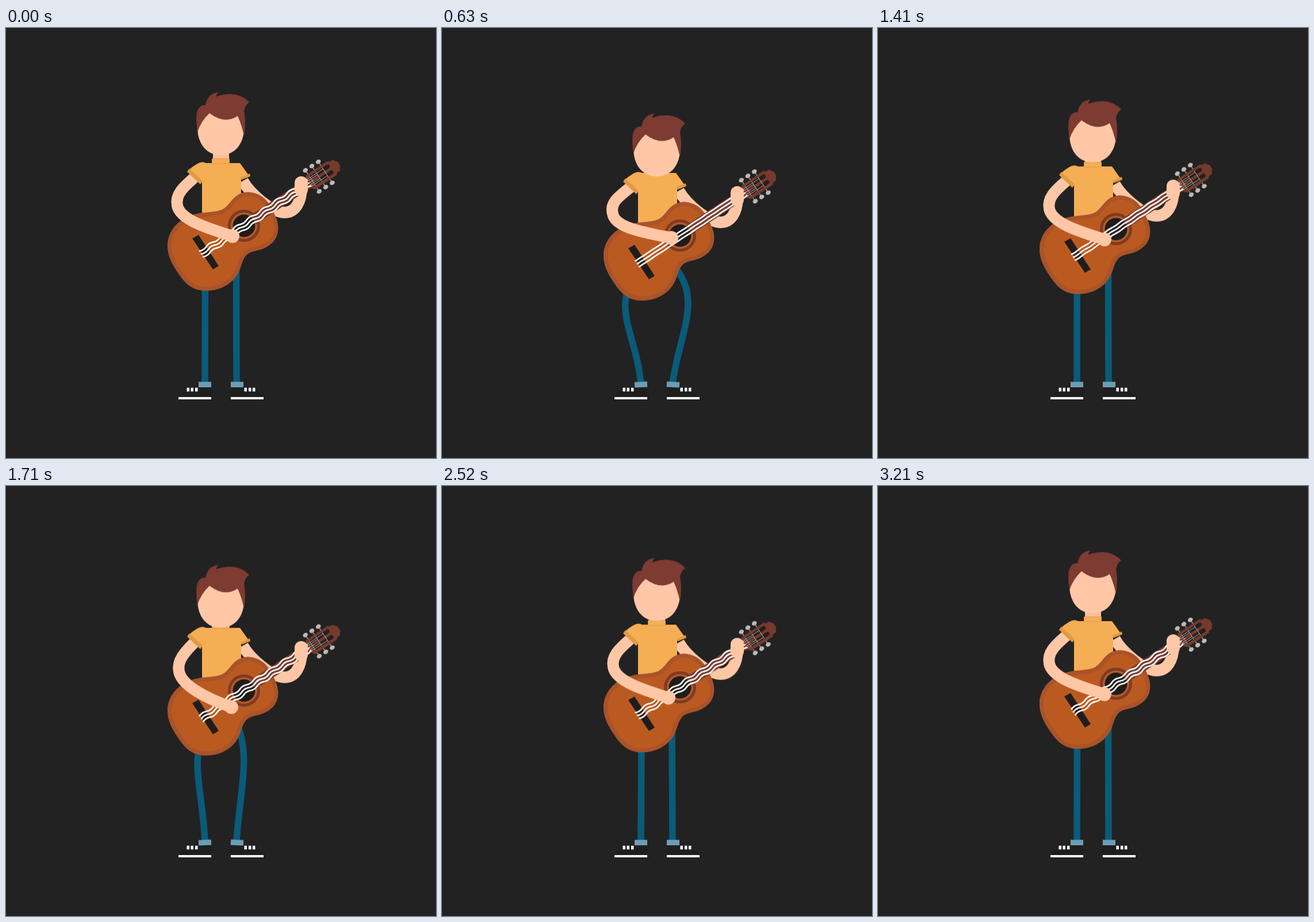
Write an HTML page without scripts that moves like this. It is 748 by 748 pixels and loops after 3240 ms.

```html
<!DOCTYPE html>
<html lang="en">
<head>
<meta charset="utf-8">
<title>Guitar player</title>
<style>
html, body { margin: 0; height: 100%; overflow: hidden; background: #222; }
svg { display: block; width: 100vw; height: 100vh; }

/* strength of the beat, swelling over three beats */
@property --depth { syntax: "<number>"; inherits: true; initial-value: 1; }
:root { --beat: 540ms; --sine: cubic-bezier(.37, 0, .63, 1); }
.man { animation: swell calc(3 * var(--beat)) var(--sine) infinite; }
@keyframes swell {
  0%, 100% { --depth: .65; }
  50% { --depth: 1; }
}

/* quick drop, slower rise; the legs straighten first */
.body, .head, .leg, .cuff { animation: bob var(--beat) var(--sine) infinite; }
.body { --drop: 18px; }
.head { --drop: 21px; }
@keyframes bob {
  18% { transform: translateY(calc(var(--drop) * var(--depth))); }
}

.leg {
  fill: none; stroke: #0a5b79; stroke-width: 11.5; vector-effect: non-scaling-stroke;
  transform: scaleX(calc(var(--depth) * var(--depth)));
}
.l.leg { animation-name: bend-l; transform-origin: 346px 0; }
.r.leg { animation-name: bend-r; transform-origin: 401px 0; }
@keyframes bend-l {
  0%, 66%, 100% { d: path("M347 420C347 480 347 530 346 618"); }
  18% { d: path("M347 420C283 480 337 530 346 618"); }
}
@keyframes bend-r {
  0%, 66%, 100% { d: path("M400 410C400 470 401 540 401 618"); }
  18% { d: path("M400 410C461 470 414 530 401 618"); }
}

.cuff { fill: #6c9db6; animation-name: tilt; transform-box: fill-box; transform-origin: center; }
.l.cuff { --tilt: -3deg; }
.r.cuff { --tilt: 3deg; }
@keyframes tilt {
  0%, 66%, 100% { transform: rotate(0deg); }
  18% { transform: rotate(var(--tilt)); }
}

.arm { fill: none; stroke: #ffc7a6; stroke-width: 20; }

/* rest, down stroke, up stroke */
.strum { animation: strum calc(3240ms / 14) var(--sine) infinite; }
@keyframes strum {
  0%, 31%, 88%, 100% { d: path("M329 259C308 277 294 290 298 309C303 334 352 349 394 362"); }
  40%, 53% { d: path("M329 259C311 277 297 292 301 311C306 336 350 358 392 373"); }
  72% { d: path("M329 259C306 277 292 287 297 306C301 331 355 339 399 348"); }
}

/* fretting hand slips down the neck once per loop */
.slide { animation: slide 3240ms var(--sine) infinite; }
.forearm { animation: reach 3240ms var(--sine) infinite; }
@keyframes slide {
  0%, 28%, 37%, 100% { transform: none; }
  32.4% { transform: translate(-7px, 6px); }
}
@keyframes reach {
  0%, 28%, 37%, 100% { d: path("M412 266C426 290 462 320 484 321C504 321 513 302 514 280"); }
  32.4% { d: path("M412 266C424 292 458 325 479 326C498 326 506 308 507 286"); }
}

.string {
  fill: none; stroke: #fff; stroke-width: 2.6; stroke-linecap: round;
  animation: buzz calc(3240ms / 16) linear infinite;
}
@keyframes buzz {
  0%, 50%, 100% { d: path("M0 0q7 0 14 0t14 0"); }
  10%, 45% { d: path("M0 0q7 3 14 0t14 0"); }
  60%, 90% { d: path("M0 0q7 -3 14 0t14 0"); }
}
</style>
</head>
<body>
<svg class="man" viewBox="0 0 748 748">
  <defs>
    <path id="box" d="M420 285.5C445 286 458 303 465 320C473 335 475 347 472 358C468 375 450 385 432 388C415 392 413 402 408 416C400 442 375 457 348 457C325 457 312 445 300 427C288 410 281 395 281 378C282 352 300 333 325 325C345 319 362 322 376 316C392 308 394 287 420 285.5Z"/>
    <clipPath id="inside"><use href="#box"/></clipPath>
    <marker id="hand" markerUnits="userSpaceOnUse" markerWidth="24" markerHeight="24" refX="12" refY="12">
      <circle cx="12" cy="12" r="12" fill="#ffc7a6"/>
    </marker>
    <g id="peg">
      <path d="M0 -7V-20" stroke="#8b8580" stroke-width="2"/>
      <ellipse cy="-22" rx="4.6" ry="3.6" fill="#bdb9b3"/>
    </g>
    <g id="pegs">
      <use href="#peg" x="231"/><use href="#peg" x="244.5"/><use href="#peg" x="258"/>
    </g>
    <g id="shoe">
      <path d="M357 625V641H301Q304 633 314 631V625Z" fill="#1f1e1e"/>
      <path d="M314.5 629h4.500m2.500 0h4.500m3 0h4.500" stroke="#fff" stroke-width="6.500"/>
      <path d="M300 644H357" stroke="#fff" stroke-width="4"/>
    </g>
    <!-- one wave of three strings, doubled up to full length -->
    <g id="wave">
      <path class="string" transform="translate(0 -6)"/>
      <path class="string"/>
      <path class="string" transform="translate(0 6)"/>
    </g>
    <g id="wave2"><use href="#wave"/><use href="#wave" x="28"/></g>
    <g id="wave4"><use href="#wave2"/><use href="#wave2" x="56"/></g>
  </defs>

  <path class="l leg"/>
  <path class="r leg"/>
  <use href="#shoe"/>
  <use href="#shoe" transform="matrix(-1 0 0 1 748 0)"/>
  <rect class="l cuff" x="335" y="615.500" width="22" height="9.500"/>
  <rect class="r cuff" x="391" y="615.500" width="22" height="9.500"/>

  <g class="body">
    <path class="arm forearm"/>

    <g fill="#f6ae55">
      <path d="M360 205H388V229H360Z" fill="#f9bf9a"/>
      <path d="M341 235H407L422 256 409 262V335H341Z"/>
      <path d="M358.500 227.500H388.500V236H358.500Z" stroke="#e39c44"/>
      <path d="M424 253L425 258 410 264 408 260Z" fill="#e09a41"/>
    </g>

    <use href="#box" fill="#bb5a20"/>
    <use href="#box" fill="none" stroke="#a9532a" stroke-width="14" clip-path="url(#inside)"/>
    <circle cx="414" cy="344" r="25.500" fill="none" stroke="#7b3b28" stroke-width="5"/>
    <circle cx="414" cy="344" r="19.500" fill="#1f1d1c"/>
    <path d="M324 366L335 360 370 414 360 420Z" fill="#1f1d1c"/>

    <g transform="translate(340 393) rotate(-33.4)">
      <use href="#pegs"/>
      <use href="#pegs" transform="scale(1 -1)"/>
      <path d="M108 -9H222L227 -14H272Q274 -10 281 -11 283 -6 286 -4V5Q283 7 281 12 274 11 272 15H227L222 9H108Z" fill="#763a2c"/>
      <path d="M232 -6H267M232 6H267" stroke="#242020" stroke-width="7" stroke-linecap="round"/>
      <path d="M222 -7H258M222 -4H244M222 0H234M222 4H244M222 7H258M231 -10V10M244.500 -10V10M258 -10V10" stroke="#aaa29d"/>
      <use href="#wave4"/>
      <use href="#wave4" x="112"/>
    </g>

    <rect class="slide" x="502" y="258" width="23" height="35" rx="11.500" fill="#ffc7a6"/>
    <path class="arm strum" marker-end="url(#hand)"/>
    <path d="M348 235Q341 231 333 236 324 241 318 247L341 269 352 262Z" fill="#f6ae55"/>
    <path d="M319 244.500L342 266 338 272 315 250Z" fill="#e09a41"/>

    <g class="head">
      <path d="M333 172Q336 140 373 140 412 140 414 176C413 203 397 221 373.500 221 350 221 333 203 333 172Z" fill="#ffc7a6"/>
      <path d="M333 181Q330 160 332 147 336 133 347 134 351 113 370 112 365 117 366 119 402 107 423 129 416 134 414 144 418 163 414 188 410 168 403 153 380 168 354 148 339 162 333 181Z" fill="#7d3b32"/>
    </g>
  </g>
</svg>
</body>
</html>
```
